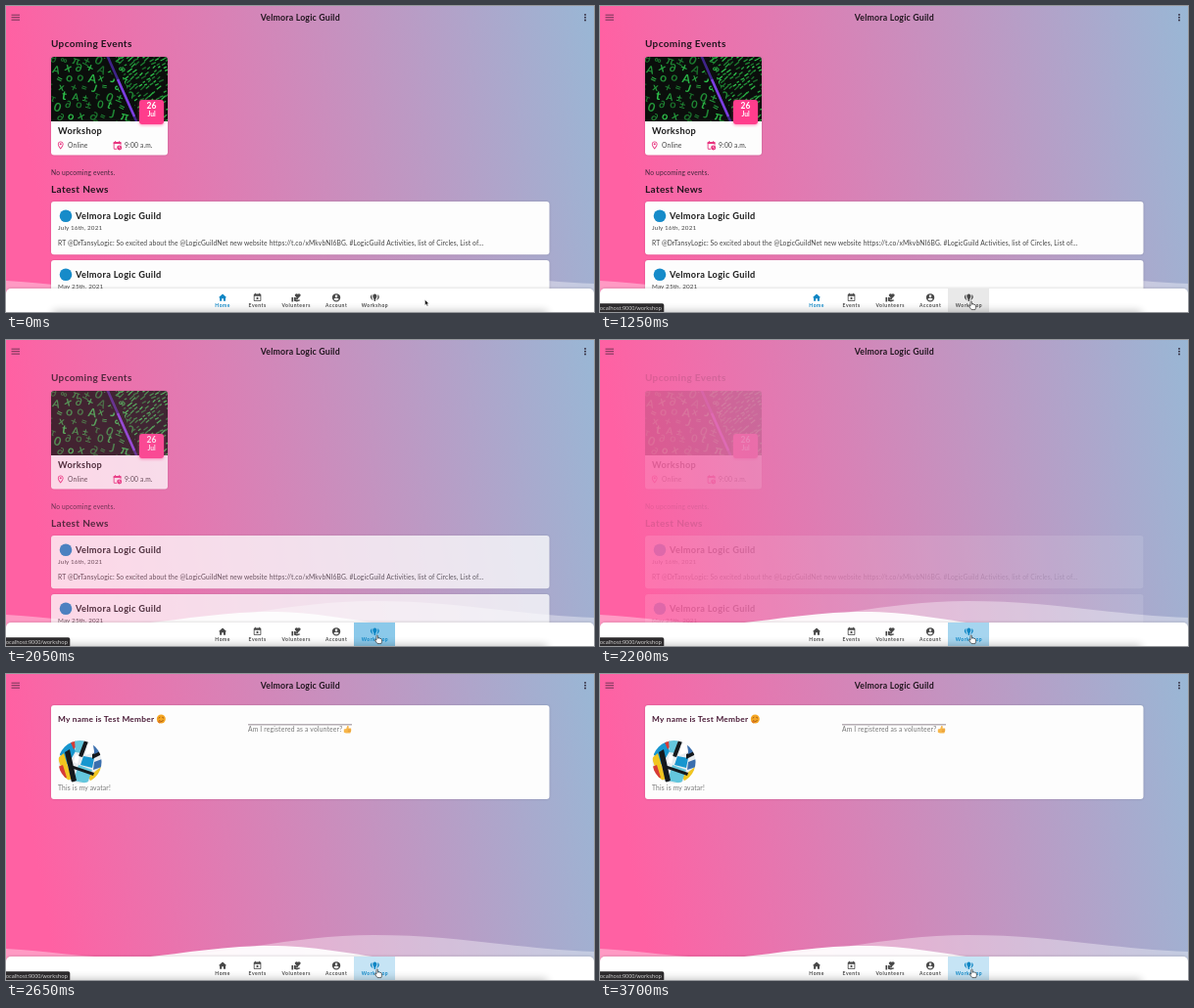
Recreate the animation shown at these times as an HTML page. Size 600 by 313 pixels, loop 3.75 s.

```html
<!DOCTYPE html>
<html lang="en">
<head>
<meta charset="utf-8">
<title>Velmora Logic Guild</title>
<style>
html,body{margin:0;width:100%;height:100%;overflow:hidden}
body{background:linear-gradient(80deg,#ff61a3 8%,#99b7d5)}
svg{display:block;width:100vw;height:100vh}
text{font-family:Lato,"Open Sans",sans-serif;white-space:pre}
.h{font-size:10px;font-weight:700;letter-spacing:.35px;fill:#23151f}
.t{font-size:6.7px;letter-spacing:.18px;fill:#444}
.soft{letter-spacing:.2px;fill:#777}
.name{font-size:9.2px;font-weight:700;letter-spacing:.33px;fill:#1c1c1c}
.date{font-size:6.3px;letter-spacing:.15px;fill:#444}
.card{fill:#fdfdfd;filter:drop-shadow(0 .5px 1px rgba(0,0,0,.16))}
.tab text{font-size:5px;font-weight:700;letter-spacing:.55px;text-anchor:middle}
.white{fill:#fff;font-weight:700;text-anchor:middle}
#glyphs text{font-weight:700}
</style>
</head>
<body>
<svg viewBox="0 0 600 313" preserveAspectRatio="none">
<defs>
  <clipPath id="photoClip"><path d="M46 118V55a3 3 0 0 1 3-3h113a3 3 0 0 1 3 3v63z"/></clipPath>
  <clipPath id="avatarClip"><circle cx="75.5" cy="90" r="22"/></clipPath>
  <clipPath id="tabClip"><path d="M355 289h42v24h-42z"/></clipPath>
  <path id="cal" d="M16 1v2H8V1H6v2H5c-1.1 0-2 .9-2 2v14c0 1.1.9 2 2 2h14c1.1 0 2-.9 2-2V5c0-1.1-.9-2-2-2h-1V1zm3 18H5V8h14z" fill-rule="evenodd"/>
</defs>

<path fill="#fff" opacity=".36" d="M0 281C40 283 80 290 130 291C220 289 290 267 375 267C460 267 520 281 600 284V313H0Z"/>
<path fill="#fff" opacity=".93" d="M125 291C170 288 215 278 268 278C315 278 350 286 388 291Z"/>

<path d="M5.5 9.2h8.5M5.5 11.7h8.5M5.5 14.2h8.5" stroke="#4d2940" stroke-width=".8"/>
<g fill="#2b2233"><circle cx="591" cy="8.9" r=".9"/><circle cx="591" cy="11.7" r=".9"/><circle cx="591" cy="14.5" r=".9"/></g>
<text x="300.3" y="14.6" text-anchor="middle" font-size="8.75" font-weight="700" letter-spacing=".2" fill="#21161f">Velmora Logic Guild</text>

<g id="home">
  <text class="h" x="46" y="42">Upcoming Events</text>
  <rect class="card" x="46" y="52" width="119" height="100.5" rx="3"/>
  <g clip-path="url(#photoClip)">
    <path fill="#0b0e0c" d="M46 52h119v66H46z"/>
    <g id="glyphs"></g>
    <path d="M104 50L135 120" stroke="#0b0e0c" stroke-width="8"/>
    <path d="M103 50L134 120" stroke="#3f2489" stroke-width="2.6"/>
    <path d="M114 75L131 113" stroke="#7c3fe0" stroke-width="2.4"/>
  </g>
  <rect x="136" y="96" width="25" height="25" rx="3" fill="#ff3d8c" style="filter:drop-shadow(0 1px 1.5px rgba(255,61,140,.55))"/>
  <text class="white" x="148.5" y="105.4" font-size="8.5">26</text>
  <text class="white" x="148.5" y="112.9" font-size="6.7">Jul</text>
  <text class="name" x="53" y="131">Workshop</text>
  <g fill="#e8347f">
    <g transform="translate(50.8 137.6) scale(.41)">
      <path fill-rule="evenodd" d="M12 2C8.1 2 5 5.1 5 9c0 5.3 7 13 7 13s7-7.7 7-13c0-3.9-3.1-7-7-7zM7 9c0-2.8 2.2-5 5-5s5 2.2 5 5c0 2.9-2.9 7.2-5 9.9C9.9 16.2 7 11.9 7 9z"/><circle cx="12" cy="9" r="2.5"/>
    </g>
    <g transform="translate(108.4 137.6) scale(.43)">
      <use href="#cal"/><path d="M3 4h18v4H3z"/><circle cx="17" cy="17" r="7" fill="#fff"/><circle cx="17" cy="17" r="5.8"/>
      <path d="M17 13.5V17l2.4 1.6" fill="none" stroke="#fff" stroke-width="1.4"/>
    </g>
  </g>
  <text class="t" x="63" y="145">Online</text>
  <text class="t" x="121" y="145">9:00 a.m.</text>
  <text class="t" x="46" y="173.4" style="fill:#45263d">No upcoming events.</text>
  <text class="h" x="46" y="191.3">Latest News</text>
  <rect class="card" x="46" y="200" width="508.5" height="54.3" rx="3"/>
  <circle cx="61" cy="214.8" r="6.3" fill="#168bc9"/>
  <text class="name" x="71" y="218">Velmora Logic Guild</text>
  <text class="date" x="53" y="229.2">July 16th, 2021</text>
  <text class="t" x="53" y="245" style="letter-spacing:.14px">RT @DrTansyLogic: So excited about the @LogicGuildNet new website https://t.co/xMkvbNI6BG. #LogicGuild Activities, list of Circles, List of...</text>
  <rect class="card" x="46" y="260" width="508.5" height="54" rx="3"/>
  <circle cx="61" cy="274.8" r="6.3" fill="#168bc9"/>
  <text class="name" x="71" y="278">Velmora Logic Guild</text>
  <text class="date" x="53" y="289.4">May 25th, 2021</text>
</g>

<g id="work">
  <rect class="card" x="46" y="32" width="508.5" height="96" rx="3"/>
  <text x="53" y="48.7" font-size="8.3" font-weight="700" letter-spacing=".28" fill="#4b1c38">My name is Test Member</text>
  <circle cx="158.3" cy="46" r="4.5" fill="#f5a623"/>
  <path d="M155.7 45.2l1.6-1M159.3 44.2l1.7 1M156 47.5q2.3 2.2 4.6 0" fill="none" stroke="#8b4a16" stroke-width=".8"/>
  <path d="M154.2 48.6l3-1.2 1.2 2-2 1.2z" fill="#e07b1d"/>
  <path d="M247 51.5h106v.8h-106z" fill="#70606c"/>
  <text class="t soft" x="247" y="59.3">Am I registered as a volunteer?</text>
  <path d="M344.8 56.4l2.4-.4 1.2-3.2 1.4.6-.3 2.2h2.6q.8 2.8-.8 5h-4.3l-2.2-.8z" fill="#f7b64a"/>
  <path d="M348.8 57h3.2M348.8 58.6h3" stroke="#d98a2b" stroke-width=".5"/>
  <g clip-path="url(#avatarClip)">
    <path fill="#e9edf0" d="M53 67h46v46H53z"/>
    <path fill="#1796cf" d="M53 80l14-13 4 12-8 14zM79 84l11 2-2 10-12-3z"/>
    <path fill="#f1c51f" d="M53 86l6-5 8 26-6 3zM84 105l13-10v10l-9 8z"/>
    <path fill="#d73b35" d="M53 95l5-2 4 13-5 2zM66 70l4-3 3 6-4 4z"/>
    <path fill="#64c6dd" d="M74 93l14 5-5 14-14-3zM70 68l10-1-3 14-6-1z"/>
    <path fill="#14181c" d="M60 80l5-3 7 32-5 2zM80 68l4 1-6 16-4-1zM88 82l10-4v4l-10 5zM66 93l24 8-1 3-23-8z"/>
    <path fill="#3b6fae" d="M89 72l9 6-8 4zM90 90l8-3v8l-9 3z"/>
    <path fill="#fff" d="M83 72l5-2 2 10-9 3zM71 82l4 2-2 8-4-2z"/>
  </g>
  <text class="t soft" x="53" y="119.2">This is my avatar!</text>
</g>

<path fill="#fff" d="M0 313V294a5 5 0 0 1 5-5h590a5 5 0 0 1 5 5v19z" style="filter:drop-shadow(0 -.5px 1px rgba(0,0,0,.1))"/>
<g clip-path="url(#tabClip)">
  <path id="tabBg" d="M355 289h42v24h-42z"/>
  <circle id="ripple" cx="379" cy="303" fill="#1a93d2"/>
</g>
<path d="M48 312h504v10H48z" opacity=".24" style="filter:blur(4px)"/>
<g id="tabs"></g>

<g id="status">
  <path fill="#2d2b2d" d="M0 304.2h63.5a1.8 1.8 0 0 1 1.8 1.8v7H0z"/>
  <text x="-1.6" y="310.8" font-size="5.5" fill="#ddd" style="font-family:'Open Sans',sans-serif">localhost:9000/workshop</text>
</g>
<g id="cursor">
  <path id="arrow" d="M0 0V5.6L1.4 4.4 2.3 6.4 3.2 6 2.3 4.1H4.1Z" fill="#111" stroke="#fff" stroke-width=".4"/>
  <path id="hand" d="M0 .5Q.7-.4 1.4.5V3.2L2.6 2.9 3.8 3.3 5 3.8 5.5 4.6V6.6L4.8 8.6H1.1L-1.6 5.3Q-1.7 4.3-.8 4.6L0 5.3Z" fill="#fff" stroke="#222" stroke-width=".65" stroke-linejoin="round"/>
</g>
</svg>
<script>
const $ = id => document.getElementById(id);
const LOOP = 3750, BLUE = '#0f86c4', DARK = '#484848';
const clamp = v => Math.max(0, Math.min(1, v));
const part = (t, a, b) => clamp((t - a) / (b - a));
const ease = p => p * p * (3 - 2 * p);
const mix = (a, b, p) => a + (b - a) * p;

const tabs = [
  ['Home', 221, '<path d="M10 20v-6h4v6h5v-8h3L12 3 2 12h3v8z"/>'],
  ['Events', 256.5, '<use href="#cal"/><path d="M12 9.6l1.2 2.6 2.8.3-2.1 1.9.6 2.8-2.5-1.4-2.5 1.4.6-2.8L8 12.5l2.8-.3z"/>'],
  ['Volunteers', 296, '<path d="M1 11h4v11H1zM16 3.2c.8-.8 1.9-1.2 3-1.2 2.2 0 4 1.7 4 3.9 0 2.7-3 4.9-7 8.1-4-3.2-7-5.4-7-8.1C9 3.7 10.8 2 13 2c1.1 0 2.2.4 3 1.2zM20 17h-7l-2.1-.7.3-1L13 16h2.8c.7 0 1.2-.5 1.2-1.2 0-.5-.3-.9-.8-1.1L9 11H7v9l7 2 8-3c0-1.1-.9-2-2-2z"/>'],
  ['Account', 337, '<path fill-rule="evenodd" d="M12 2a10 10 0 1 0 0 20a10 10 0 1 0 0-20zm0 3a3 3 0 1 1 0 6a3 3 0 1 1 0-6zm0 14.2c-2.5 0-4.7-1.3-6-3.2 0-2 4-3.1 6-3.1s6 1.1 6 3.1c-1.3 1.9-3.5 3.2-6 3.2z"/>'],
  ['Workshop', 376.3, '<path d="M12 3c3 0 5 2.4 5 5.4 0 3.6-2.6 6-3.4 9.1V21h-3.2v-3.5C9.6 14.4 7 12 7 8.4 7 5.4 9 3 12 3zM5 4C-1 8 1 15 8 19 5 14 4 10 5 4zM19 4c6 4 4 11-3 15 3-5 4-9 3-15z"/>']
];
$('tabs').innerHTML = tabs.map(([name, x, icon]) =>
  `<g class="tab"><g transform="translate(${x - 5} 293.3) scale(.42)">${icon}</g><text x="${x + .2}" y="308.2">${name}</text></g>`).join('');
const [homeTab, , , , workTab] = $('tabs').children;
for (const tab of $('tabs').children) tab.setAttribute('fill', DARK);

// Large symbols on the left, dense slanted strokes on the right
function drawGlyphs() {
  let seed = 17, out = '';
  const rnd = () => (seed = seed * 16807 % 2147483647) / 2147483647;
  const green = () => `hsl(132 62% ${26 + rnd() * 22 | 0}%)`;
  const signs = 'AoJ+π=Σx0∂±tτ∞';
  for (let x = 32; x < 116; x += 11)
    for (let y = 56; y < 126; y += 9.5) {
      const px = x + (y - 54) * .3 + rnd() * 2, py = y + rnd() * 3;
      out += `<text transform="translate(${px.toFixed(1)} ${py.toFixed(1)}) rotate(${8 + rnd() * 24 | 0})" font-size="${(10 + rnd() * 3).toFixed(1)}" fill="${green()}">${signs[rnd() * signs.length | 0]}</text>`;
    }
  for (let x = 90; x < 166; x += 5.5)
    for (let y = 52; y < 120; y += 3.6) {
      const px = x + (y - 52) * .44, len = 2 + rnd() * 3;
      if (px < 112 + (y - 52) * .44 || rnd() < .2) continue;
      out += `<path d="M${px.toFixed(1)} ${(y + rnd() * 2).toFixed(1)}l${len.toFixed(1)} ${(-len * (.4 + rnd() * .6)).toFixed(1)}" stroke="${green()}" stroke-width="1.3"/>`;
    }
  $('glyphs').innerHTML = out;
}
drawGlyphs();

function render(t) {
  const go = ease(part(t, 60, 550)), settle = ease(part(t, 600, 1100));
  const x = mix(427.5, 384, go) - 6 * settle + .8 * part(t, 2700, 3500);
  const y = mix(300.5, 300, go) + 2 * settle;
  const over = x < 397;
  $('cursor').setAttribute('transform', `translate(${x} ${y})`);
  $('arrow').style.display = over ? 'none' : '';
  $('hand').style.display = over ? '' : 'none';
  $('status').style.display = t >= 700 ? '' : 'none';

  const active = t >= 2000;
  homeTab.setAttribute('fill', active ? DARK : BLUE);
  workTab.setAttribute('fill', active ? BLUE : DARK);
  $('tabBg').setAttribute('fill', active ? '#c6e4f5' : '#e9e9e9');
  $('tabBg').setAttribute('opacity', part(t, 560, 860));
  $('ripple').setAttribute('r', 34 * ease(part(t, 1900, 2060)));
  $('ripple').setAttribute('opacity', .34 * (1 - part(t, 2060, 2370)));

  $('home').setAttribute('opacity', 1 - part(t, 1995, 2230));
  $('work').setAttribute('opacity', part(t, 2230, 2480));
}

const start = performance.now();
function tick() {
  render((performance.now() - start) % LOOP);
  requestAnimationFrame(tick);
}
tick();
</script>
</body>
</html>
```
